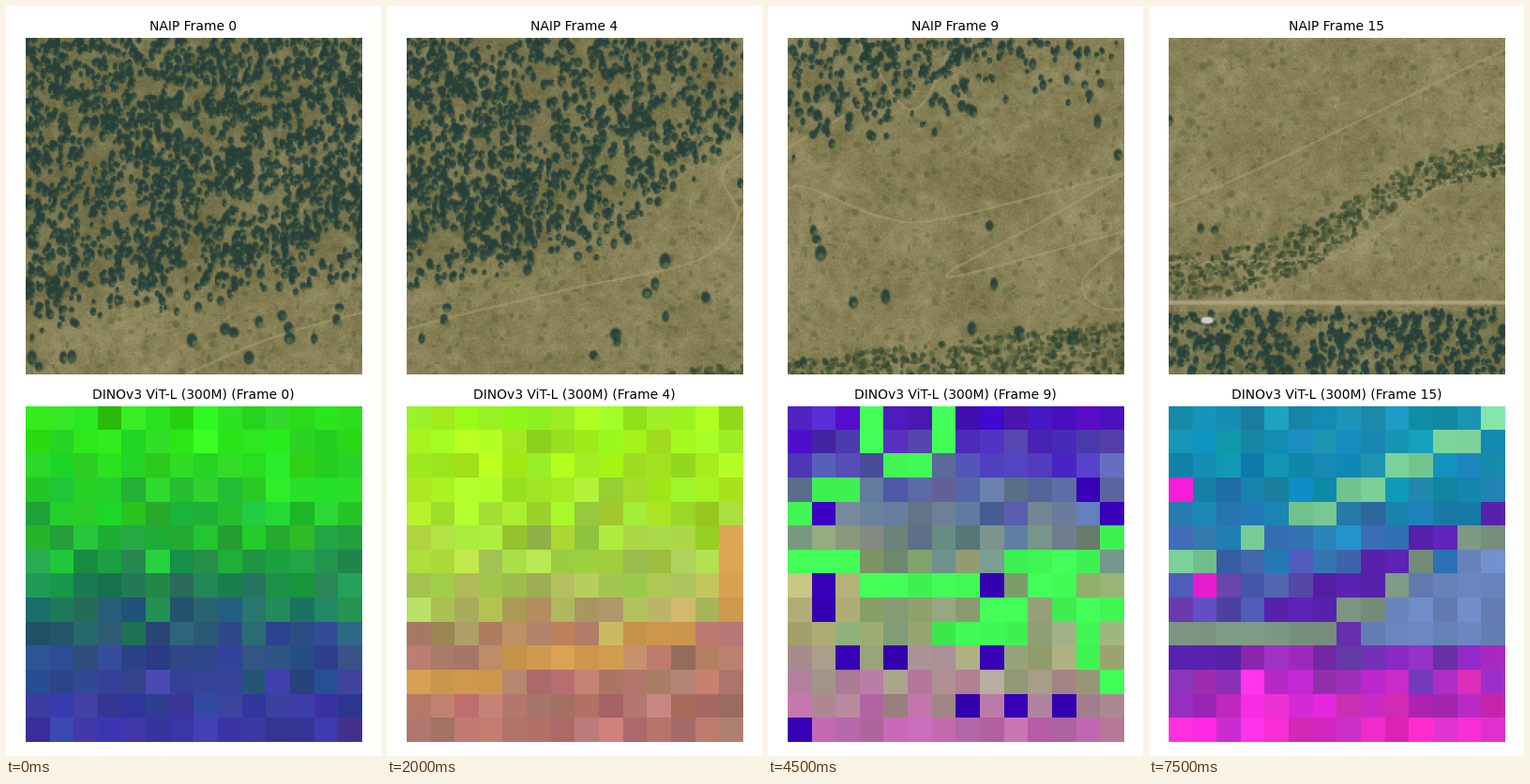
Animation, 400 px wide and 800 px high, one loop 8 s. Source, as a matplotlib script:

```python
import numpy as np
import matplotlib.pyplot as plt
from matplotlib.animation import FuncAnimation
from matplotlib.colors import to_rgb

FRAMES, INTERVAL = 16, 500
VIEW, STEP, CELLS = 358.5, 73, 14      # stage pixels
TILE = 224                             # raster pixels in one view
SCALE = TILE / VIEW
STRIP = VIEW + STEP * (FRAMES - 1)
W = round(STRIP * SCALE) + 2
rng = np.random.default_rng(7)


def rgb(color):
    return np.array(to_rgb(color))


def ramp_down(x, start, drop, middle, width):
    return start - drop / (1 + np.exp((middle - x) / width))


# Terrain rules, in stage pixels along the whole strip
def forest_edge(x):
    return ramp_down(x, 285 - 0.15 * x, 95, 570, 30)


def creek_y(x):
    return ramp_down(x, 238, 105, 1345, 30)


def forest_density(x, y):
    peak = np.clip(1 - (x / 1100) ** 2, 0, 1)
    north = peak * np.clip((forest_edge(x) + 35 - y) / 60, 0, 1)
    south = 0.8 * (y > 290) / (1 + np.exp((1040 - x) / 12))
    return np.maximum(north, south)


def in_scrub(x, y):
    bottom = (x > 480) & (x < 1090) & (y > 365 - 0.12 * (x - 480))
    center = ramp_down(x, 258, 135, 1290, 50)
    half = np.clip(24 - (x - 1200) / 30, 14, 24)
    return bottom | ((x > 1080) & (np.abs(y - center) < half))


def curve(points, spacing=1.0):
    """Evenly spaced samples on a smooth curve through the points."""
    p = np.array(points, float)
    p = np.vstack([2 * p[0] - p[1], p, 2 * p[-1] - p[-2]])
    t = np.linspace(0, 1, 40)[:, None]
    path = np.vstack([
        0.5 * (2 * b + (c - a) * t + (2 * a - 5 * b + 4 * c - d) * t**2
               + (3 * b - a - 3 * c + d) * t**3)
        for a, b, c, d in zip(p, p[1:], p[2:], p[3:])])
    dist = np.r_[0, np.cumsum(np.hypot(*np.diff(path, axis=0).T))]
    s = np.arange(0, dist[-1], spacing)
    return np.c_[np.interp(s, dist, path[:, 0]),
                 np.interp(s, dist, path[:, 1])]


trails = np.vstack([curve(points) for points in (
    [(150, 366), (279, 313), (459, 268), (600, 236), (643, 190), (630, 138),
     (724, 78)],
    [(643, 190), (668, 157), (757, 190), (826, 191), (1020, 142)],
    [(1020, 142), (926, 196), (826, 252), (914, 233), (1127, 166),
     (1454, 11)],
    [(1036, 204), (972, 256), (997, 288), (1082, 278)],
    [(733, 4), (790, 76), (836, 0)],
)])
creek_x = np.arange(1080, STRIP)
creek = np.c_[creek_x, creek_y(creek_x)]
road = np.c_[creek_x, np.full(len(creek_x), 281.0)]

# A few landmark trees, then scattered ones below the forest
scatter_x = rng.uniform(0, 1100, 36)
scatter_top = forest_edge(scatter_x) + 45
scatter_y = scatter_top + (350 - scatter_top) * rng.random(36)
lone_trees = np.vstack([
    [(279, 308), (407, 231), (572, 129), (646, 154), (704, 112), (727, 281),
     (1128, 202), (1143, 204)],
    np.c_[scatter_x, scatter_y]])


def mottle(step):
    """Smooth seeded noise over the strip."""
    gh, gw = TILE // step + 2, W // step + 2
    knots = rng.normal(size=(gh, gw))
    xs, ys = np.arange(W) / step, np.arange(TILE) / step
    rows = np.array([np.interp(xs, np.arange(gw), r) for r in knots])
    return np.array([np.interp(ys, np.arange(gh), c) for c in rows.T]).T


def blob(img, x, y, rx, ry, color, alpha=1.0):
    """Soft ellipse in raster pixels."""
    x0, x1 = max(int(x - rx - 1), 0), min(int(x + rx + 3), W)
    y0, y1 = max(int(y - ry - 1), 0), min(int(y + ry + 3), TILE)
    if x0 >= x1 or y0 >= y1:
        return
    yy, xx = np.ogrid[y0:y1, x0:x1]
    d = np.hypot((xx - x) / rx, (yy - y) / ry)
    a = (alpha * np.clip((1.15 - d) * 2.5, 0, 1))[..., None]
    img[y0:y1, x0:x1] += a * (color - img[y0:y1, x0:x1])


def tree(img, x, y, r):
    blob(img, x, y, r * rng.uniform(0.75, 1.1), r * rng.uniform(1, 1.5),
         rgb("#263f39"), 0.9)
    blob(img, x + rng.uniform(0, 0.8) * r, y + rng.uniform(0.1, 0.9) * r,
         0.6 * r, 0.6 * r, rgb("#5c7048"), rng.uniform(0.2, 0.9))


def random_spots(n):
    spots = rng.uniform((0, 0), (W, TILE), (n, 2))
    return spots[np.argsort(spots[:, 1])]


def build_strip():
    img = np.tile(rgb("#8a8359"), (TILE, W, 1))
    yy, xx = np.mgrid[0:TILE, 0:W] / SCALE
    wooded = np.clip(forest_density(xx, yy), 0, 1)[..., None]
    img += 0.65 * wooded * (rgb("#6b6c46") - img)
    img += (0.02 * mottle(24) + 0.022 * mottle(5)
            + 0.02 * rng.normal(size=(TILE, W)))[..., None]

    for x, y in random_spots(2600):
        blob(img, x, y, *rng.uniform(0.7, 2.8, 2), rgb("#5c613d"),
             rng.uniform(0.15, 0.6))
    for x, y in trails * SCALE:
        blob(img, x, y, 0.8, 0.8, rgb("#ab9d74"), 0.35)

    spots = random_spots(22000)
    for x, y in spots[in_scrub(*spots.T / SCALE)]:
        shade = rgb("#34472f") if rng.random() < 0.55 else rgb("#59653c")
        blob(img, x, y, *rng.uniform(1, 2.6, 2), shade, 0.7)
    for x, y in creek[::2] * SCALE:
        blob(img, x, y + rng.normal(), 1, 0.8, rgb("#a99c78"), 0.6)
    for x, y in road * SCALE:
        blob(img, x, y, 1.2, 1.6, rgb("#b5a888"), 0.4)

    spots = random_spots(15000)
    clump = mottle(10)[tuple(spots.T[::-1].astype(int))]
    chance = (forest_density(*spots.T / SCALE)
              * np.clip(0.85 + 0.5 * clump, 0.1, 1))
    for x, y in spots[rng.random(len(spots)) < chance]:
        tree(img, x, y, rng.uniform(1.4, 3.0))
    for x, y in lone_trees * SCALE:
        tree(img, x, y, rng.uniform(2.6, 4.0))

    blob(img, 1135 * SCALE, 300 * SCALE, 4.5, 2.5, rgb("#cfd0c8"))
    return np.clip(img, 0, 1)


# Feature colours: a ramp from top to bottom plus colours for ground classes
LOOKS = {
    0: dict(ramp="#2ee61c #28d428 #209448 #2c4c86 #3e38a8"),
    3: dict(ramp="#9cf81e #a8ec22 #aad052 #b47e6a #b8746e", trail="#d29c50"),
    5: dict(ramp="#d0f410 #b8f00c #a8e45c #a4dc84 #a8c4a0", tilt=0.5,
            trail="#908562", tree="#98eb00"),
    7: dict(ramp="#30f038 #34c058 #2a3048 #243a4e #0c5070", tilt=0.1,
            trail="#84260e", tree="#30e16e", meadow="#06502e"),
    9: dict(ramp="#4c10c6 #5a70a8 #8aa86c #9ea47c #be68b0",
            trail="#41fa55", tree="#3700b4", meadow="#acaa73"),
    11: dict(ramp="#348678 #46bcd8 #54d4dc #80bca4 #68b490",
             trail="#c0b6c0", tree="#2d6464", south="#046e60"),
    15: dict(ramp="#1692b4 #1488b2 #4064ac #7a2cb4 #fa2cd2",
             field="#6884bc", scrub="#5a22b0", creek="#7a9480",
             trail="#78cd96", tree="#f01ed7"),
}


def cell_counts(points, left):
    edges = np.linspace(0, VIEW, CELLS + 1)
    return np.histogram2d(points[:, 1], points[:, 0] - left,
                          bins=(edges, edges))[0]


def features(k):
    look = LOOKS[min(LOOKS, key=lambda key: abs(key - k))]
    noise = np.random.default_rng(100 + k)
    left = STEP * k
    row, col = np.mgrid[0:CELLS, 0:CELLS]
    ramp = np.array([rgb(c) for c in look["ramp"].split()])
    v = row + look.get("tilt", 0) * (col - 6.5)
    v = v + 0.7 * noise.normal(size=row.shape)
    stops = np.linspace(0, CELLS - 1, len(ramp))
    img = np.stack([np.interp(v, stops, channel) for channel in ramp.T], -1)
    img *= 1 + 0.06 * noise.normal(size=row.shape)[..., None]
    img += 0.02 * noise.normal(size=img.shape)

    x = left + (col + 0.5) * VIEW / CELLS
    y = (row + 0.5) * VIEW / CELLS
    classes = {
        "meadow": np.hypot((x - 690) / 42, (y - 205) / 52) < 1,
        "south": (x > 985) & (row >= 12),
        "field": (x > 1080) & (y > creek_y(x) + 20) & (y < 250),
        "scrub": in_scrub(x, y),
        "creek": cell_counts(creek, left) > 15,
        "trail": cell_counts(trails, left) > 18,
        "tree": cell_counts(lone_trees, left) > 0,
    }
    for name, mask in classes.items():
        if name in look:
            shade = 1 + 0.04 * noise.normal(size=(mask.sum(), 1))
            img[mask] = rgb(look[name]) * shade
    return np.clip(img, 0, 1)


strip = build_strip()
fig = plt.figure(figsize=(4, 8), dpi=100, facecolor="white")


def panel(bottom, img):
    ax = fig.add_axes([20.75 / 400, bottom / 800, VIEW / 400, VIEW / 800])
    ax.axis("off")
    return ax.imshow(img, aspect="auto"), ax.set_title("", fontsize=10)


photo, photo_title = panel(407.2, strip[:, :TILE])
grid, grid_title = panel(15, features(0))


def draw(k):
    x = round(STEP * k * SCALE)
    photo.set_data(strip[:, x:x + TILE])
    grid.set_data(features(k))
    photo_title.set_text(f"NAIP Frame {k}")
    grid_title.set_text(f"DINOv3 ViT-L (300M) (Frame {k})")
    return photo, grid, photo_title, grid_title


anim = FuncAnimation(fig, draw, frames=FRAMES, interval=INTERVAL, repeat=True,
                     repeat_delay=0)
plt.show()
```
